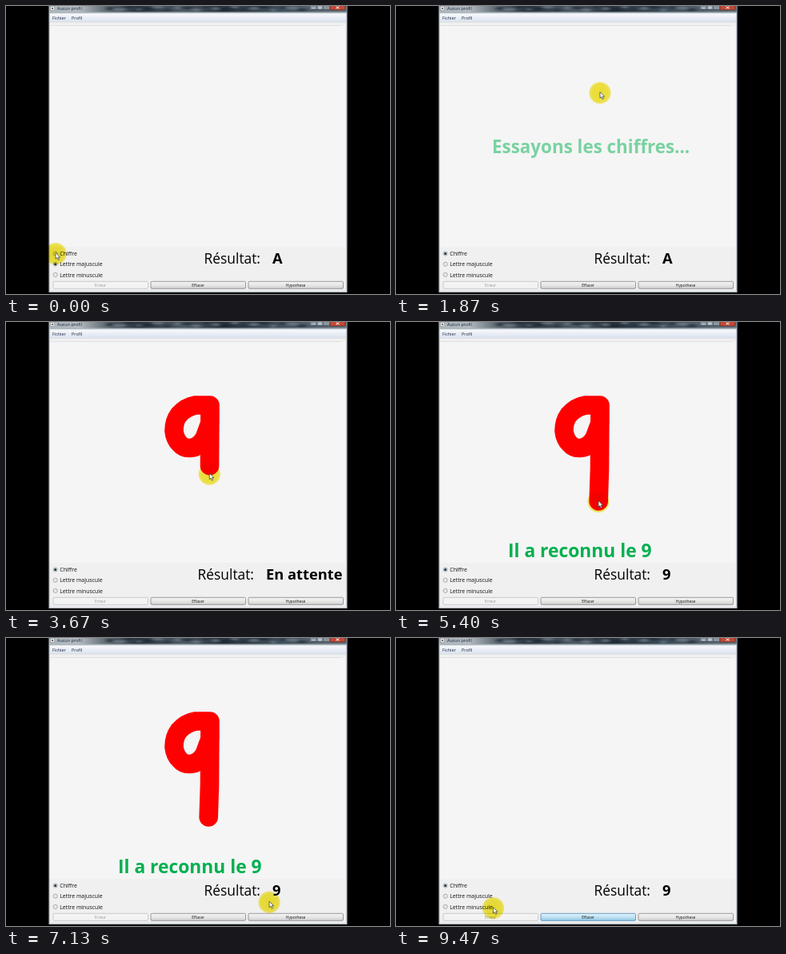
Write an HTML page that moves like this. It is 480 px wide and 360 px high and loops after 9540 ms.

```html
<!DOCTYPE html>
<html lang="fr">
<head>
<meta charset="utf-8">
<title>Reconnaissance de caractères</title>
<style>
html, body { margin: 0; width: 100%; height: 100%; overflow: hidden; background: #000; }
svg { display: block; width: 100vw; height: 100vh; }
text { font-family: "Open Sans", "Noto Sans", sans-serif; fill: #111; white-space: pre; }
.menu { font-size: 5.45px; fill: #1a2340; font-weight: 500; }
.label { font-size: 6.9px; }
.button { font-size: 4.85px; text-anchor: middle; }
.result { font-size: 17.4px; fill: #000; }
.value { font-size: 18.3px; font-weight: 700; fill: #000; }
.caption { font-weight: 700; fill: #00b050; }
#halo { mix-blend-mode: multiply; }
</style>
</head>
<body>
<svg viewBox="0 0 480 360">
  <defs>
    <linearGradient id="glass">
      <stop offset="0" stop-color="#a9b4bb"/>
      <stop offset=".1" stop-color="#b4bcc0"/>
      <stop offset=".2" stop-color="#56616a"/>
      <stop offset=".3" stop-color="#29333d"/>
      <stop offset=".45" stop-color="#4c5964"/>
      <stop offset=".58" stop-color="#27313c"/>
      <stop offset=".75" stop-color="#3c4a58"/>
      <stop offset="1" stop-color="#66737e"/>
    </linearGradient>
    <linearGradient id="menuBar" x2="0" y2="1">
      <stop stop-color="#f7f9fc"/><stop offset="1" stop-color="#dbe2ee"/>
    </linearGradient>
    <linearGradient id="plain" x2="0" y2="1">
      <stop stop-color="#f3f3f3"/><stop offset=".5" stop-color="#e8e8e8"/><stop offset="1" stop-color="#cfcfcf"/>
    </linearGradient>
    <linearGradient id="active" x2="0" y2="1">
      <stop stop-color="#e2f2fb"/><stop offset=".5" stop-color="#c0e2f4"/><stop offset="1" stop-color="#94c9e6"/>
    </linearGradient>
    <radialGradient id="glow">
      <stop stop-color="#f3e52e"/><stop offset=".75" stop-color="#f5e844"/>
      <stop offset=".92" stop-color="#f8ee78"/><stop offset="1" stop-color="#fbf6b4" stop-opacity=".2"/>
    </radialGradient>
    <filter id="soft" x="-20%" y="-50%" width="140%" height="200%"><feGaussianBlur stdDeviation="2 .6"/></filter>
    <clipPath id="titleClip"><path d="M54 0h372v9H54z"/></clipPath>
  </defs>

  <rect width="480" height="360" fill="#000"/>
  <rect x="53.5" y="0" width="373" height="358" fill="#c3cad1"/>
  <g clip-path="url(#titleClip)">
    <rect x="54" width="372" height="9" fill="url(#glass)"/>
    <g id="blobs" filter="url(#soft)"></g>
    <path d="M54 8.2h372" stroke="#aeb8bf" stroke-width="1.6"/>
    <rect x="380" y="-2" width="25" height="6.5" rx="1" fill="#8996a2" stroke="#313c46" stroke-width=".6"/>
    <path d="M388.5 0v4.5M396.5 0v4.5" stroke="#313c46" stroke-width=".6"/>
    <path d="M383 2.5h3M391 1h3v2h-3z" stroke="#eee" stroke-width=".7" fill="none"/>
    <rect x="405" y="-2" width="19" height="7" rx="1" fill="#c24a35" stroke="#4b1d18" stroke-width=".6"/>
    <path d="M412.5 .5l4 3M416.5 .5l-4 3" stroke="#fff" stroke-width=".9"/>
  </g>
  <rect x="55.5" y=".5" width="5" height="5" fill="#eee" stroke="#777" stroke-width=".4"/>
  <path d="M57 2l2 2.2M59 2l-2 2.2" stroke="#333" stroke-width=".7"/>
  <text class="menu" x="64" y="5">Aucun profil</text>

  <rect x="55" y="9.5" width="370" height="347" fill="#f0f0f0"/>
  <rect x="55" y="9.5" width="370" height="10.5" fill="url(#menuBar)"/>
  <text class="menu" x="58" y="17">Fichier</text>
  <text class="menu" x="82" y="17">Profil</text>
  <path d="M55 20.3h370M55 24.5h364" stroke="#d9dce0" stroke-width=".7"/>
  <rect x="55" y="25" width="369" height="276" fill="#f5f5f5"/>

  <g id="radios"></g>
  <g id="buttons"></g>
  <text class="result" id="result" y="322">Résultat:</text>
  <text class="value" id="value" y="322"></text>

  <path id="ink" fill="none" stroke="#f00" stroke-width="23.6" stroke-linecap="round" stroke-linejoin="round"
    d="M255 104L237 104Q225 106 216 116Q210 124 210 136Q211 146 217 152Q222 158 230 157.5Q241 157 248 145L255 126L255 104L254.5 184L253.2 224"/>
  <text class="caption" id="intro" x="120" y="184" font-size="22.4">Essayons les chiffres...</text>
  <text class="caption" id="found" x="140" y="294" font-size="22.8">Il a reconnu le 9</text>

  <circle id="halo" r="14.2" fill="url(#glow)"/>
  <path id="arrow" d="M0 0v7.6l1.8-1.6 1.3 3 1.4-.6-1.3-2.9h2.4z" fill="#fff" stroke="#333" stroke-width=".7"/>
</svg>
<script>
const LOOP = 9540, STEP = 1000 / 15;
const SELECT = 130, PEN_DOWN = 1930, PEN_UP = 4150, RECOGNISED = 4400, CLEAR = 8930;
const $ = id => document.getElementById(id);

function add(parent, tag, attrs, label = '') {
  const el = document.createElementNS('http://www.w3.org/2000/svg', tag);
  for (const key in attrs) el.setAttribute(key, attrs[key]);
  el.textContent = label;
  return parent.appendChild(el);
}

for (let i = 0; i < 22; i++) {
  const shade = i % 2 ? '#7d8c97' : '#1b242d';
  add($('blobs'), 'ellipse', { cx: 130 + i * 12, cy: 3 + 2 * Math.sin(i * 2.3), rx: 5 + 3 * Math.sin(i * 1.7), ry: 2, fill: shade, opacity: .5 });
}

const dots = ['Chiffre', 'Lettre majuscule', 'Lettre minuscule'].map((name, i) => {
  const cy = 309.5 + i * 13.2;
  add($('radios'), 'circle', { cx: 61.7, cy, r: 2.6, fill: '#e9e9e9', stroke: '#8d9399', 'stroke-width': .7 });
  add($('radios'), 'text', { class: 'label', x: 67.3, y: cy + 2.6 }, name);
  return add($('radios'), 'circle', { cx: 61.7, cy, r: 1.5, fill: '#17303f' });
});

const [, eraser] = ['Erreur', 'Effacer', 'Hypothese'].map((name, i) => {
  const x = 59 + i * 122;
  const box = add($('buttons'), 'rect', {
    x, y: 344.3, width: 118.5, height: 9, rx: 1.2, 'stroke-width': .7,
    fill: i ? 'url(#plain)' : '#f3f3f3', stroke: i ? '#777' : '#b9bcbf'
  });
  add($('buttons'), 'text', { class: 'button', x: x + 59, y: 350.6, style: i ? '' : 'fill:#969696' }, name);
  return box;
});

const ink = $('ink'), length = ink.getTotalLength(), stem = 120;

// Tables of [time, ...values]
const drawn = [[PEN_DOWN, 0], [3000, length - stem], [3670, length - 34], [PEN_UP, length]];
const before = [[0, 62, 309], [200, 62, 309], [650, 130, 235], [1150, 222, 135], [1600, 255, 108], [1870, 255, 108], [PEN_DOWN, 255, 104]];
const after = [[PEN_UP, 253, 224], [5450, 253, 224], [5950, 317, 308], [6500, 348, 318], [7130, 327, 331],
  [7600, 346, 332], [8400, 270.5, 345], [8730, 266, 345], [CLEAR, 266, 345], [9140, 218, 342], [9470, 120.5, 337]];

function sample(table, t) {
  const end = table.findIndex(row => row[0] > t);
  if (end < 0) return table[table.length - 1].slice(1);
  if (!end) return table[0].slice(1);
  const a = table[end - 1], b = table[end], k = (t - a[0]) / (b[0] - a[0]);
  return a.slice(1).map((v, i) => v + (b[i + 1] - v) * k);
}

function pointer(t) {
  if (t < PEN_DOWN) return sample(before, t);
  if (t >= PEN_UP) return sample(after, t);
  const p = ink.getPointAtLength(sample(drawn, t)[0]);
  return [p.x, p.y];
}

const fade = (t, a, b, c, d) => sample([[a, 0], [b, 1], [c, 1], [d, 0]], t)[0];

function render(time) {
  const t = Math.floor((time % LOOP + 1) / STEP) * STEP;
  const [x, y] = pointer(t);
  $('halo').setAttribute('transform', `translate(${x} ${y + .6})`);
  $('arrow').setAttribute('transform', `translate(${x} ${y - .5})`);

  // Ink trails slightly behind the pointer
  ink.setAttribute('stroke-dasharray', `${sample(drawn, t - 80)[0] + .01} ${length + 50}`);
  ink.style.display = t >= PEN_DOWN && t < CLEAR ? '' : 'none';

  const choice = t < SELECT ? 1 : 0;
  dots.forEach((dot, i) => { dot.style.display = i === choice ? '' : 'none'; });

  const waiting = t >= PEN_DOWN && t < RECOGNISED;
  $('result').setAttribute('x', waiting ? 239.5 : 247.5);
  $('value').setAttribute('x', waiting ? 325 : 333);
  $('value').textContent = waiting ? 'En attente' : t < PEN_DOWN ? 'A' : '9';

  $('intro').style.opacity = fade(t, 350, 850, 1735, 2000);
  $('found').style.opacity = fade(t, 4550, 5050, 8150, 8650);

  const pressed = t >= CLEAR;
  eraser.setAttribute('fill', pressed ? 'url(#active)' : 'url(#plain)');
  eraser.setAttribute('stroke', pressed ? '#3c7fb1' : '#777');
}

const start = performance.now();
function tick() {
  render(performance.now() - start);
  requestAnimationFrame(tick);
}
tick();
</script>
</body>
</html>
```
